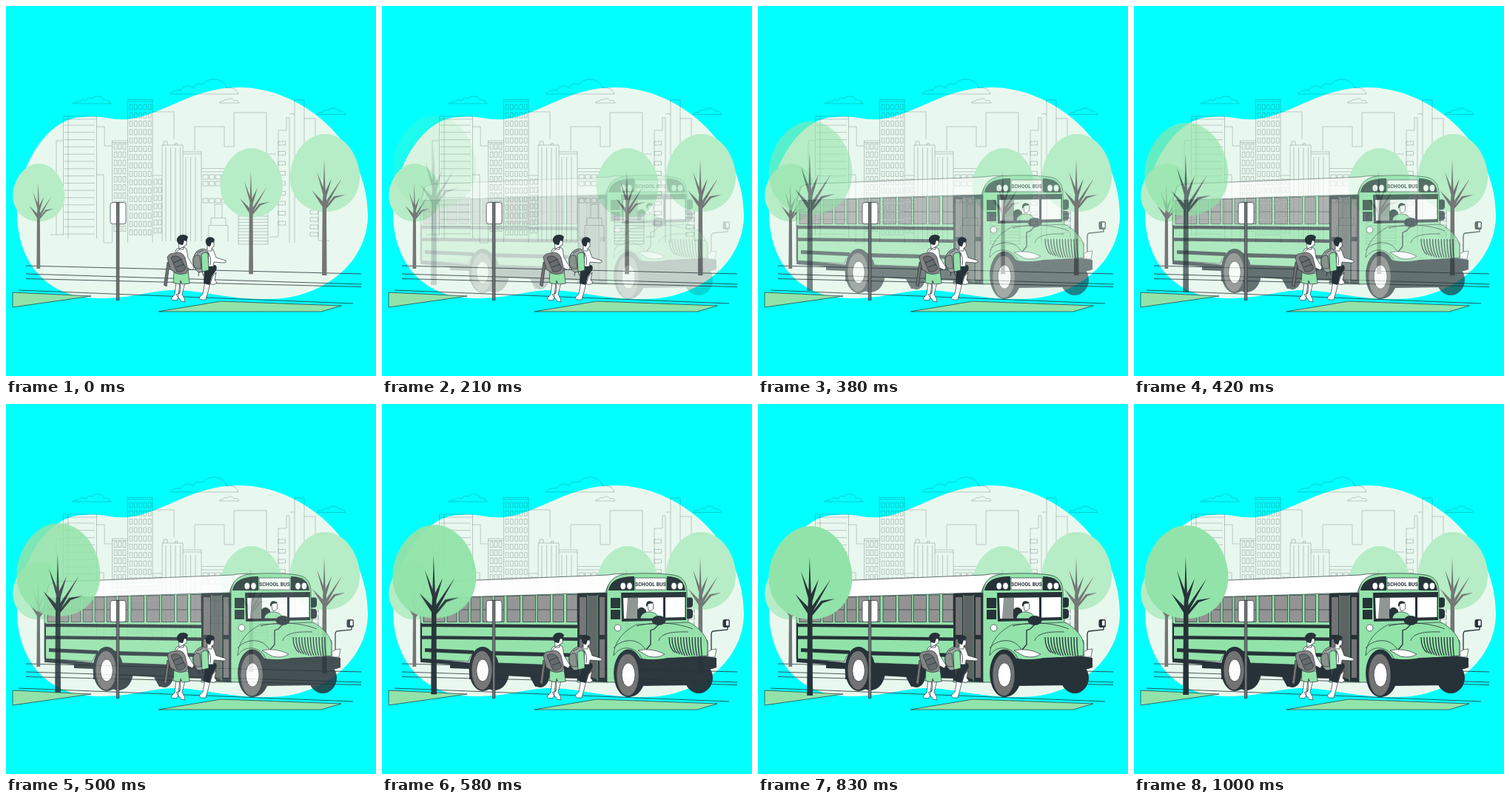
Animation of 500x500 px, one loop 1.04 s. Source, as an HTML page:

```html
<!DOCTYPE html>
<html lang="en">
<head>
<meta charset="utf-8">
<title>Walking to the bus</title>
<style>
  html, body { margin: 0; width: 100%; height: 100%; overflow: hidden; background: #0ff; }
  svg { display: block; width: 100vw; height: 100vh; }
  :root { --ink: #263238; --green: #92e3a9; --grey: #737373; }

  .thin { fill: none; stroke: var(--ink); stroke-opacity: .42; stroke-width: .6; }
  .line { fill: none; stroke: var(--ink); stroke-width: .8; }
  .rod { fill: none; stroke: var(--ink); stroke-width: 1.3; }
  .edge { stroke: var(--ink); stroke-width: .7; stroke-linejoin: round; }
  .ink { fill: var(--ink); }
  .green { fill: var(--green); }
  .white { fill: #fff; }
  .grey { fill: var(--grey); }
  .glass { fill: #939393; }
  .pale { --leaf: #b6ecc6; --wood: #747776; }
  .bold { --leaf: #92e3a9; --wood: #263238; }
  .label { font: 600 6.9px Roboto, Arial, sans-serif; font-stretch: 75%; text-anchor: middle; }

  #bus { animation: fade 1040ms infinite; }
  #near { animation: drop 1040ms infinite; }
  @keyframes fade {
    0% { opacity: 0; animation-timing-function: cubic-bezier(.36, -.01, .5, 1.38); }
    86.5%, 100% { opacity: 1; }
  }
  @keyframes drop {
    0% { opacity: 0; transform: translateY(-20px); animation-timing-function: cubic-bezier(.36, -.01, .5, 1.38); }
    86.5%, 100% { opacity: 1; transform: translateY(0); }
  }
</style>
</head>
<body>
<svg viewBox="0 0 500 500">
  <defs>
    <g id="tree">
      <path style="fill:var(--leaf)" d="M.6 0C33 0 57 36 57 70C57 103 33 126 .6 126C-31 126 -56 103 -56 70C-56 36 -31 0 .6 0Z"/>
      <path style="fill:var(--wood)" d="M-.6 42L1.400 92L11.500 72L3 102V108L28 71.500L4 115L15 101L34 98L17 104L3 121L3.600 229H-4.200L-3.400 118L-20 92L-3 109L-2.500 98L-12.500 61L-2 87Z"/>
    </g>
  </defs>

  <path fill="#e9f8ee" d="M15 280C15 220 54 150 105 150C130 147 140 155 165 153C215 147 250 110 315 110C400 110 489 185 489 283C489 345 430 396 355 396C300 397 265 384 228 384C195 384 175 395 125 395C50 395 15 340 15 280Z"/>

  <g class="thin">
    <path id="city"/>
    <path d="M90 132H142C140 128 136 126 132 127C131 121 119 120 117 125C113 123 109 125 108 128C104 126 99 127 98 130C95 129 92 130 90 132Z"/>
    <path d="M221 119H314C312 112 304 109 298 111C295 96 272 96 266 106C260 104 254 106 253 111C247 106 238 108 237 114C231 113 224 115 221 119Z"/>
    <path d="M288 131H315C314 128 311 127 308 128C307 124 300 124 299 127C296 126 294 127 293 129C291 128 289 129 288 131Z"/>
    <path d="M420 146.500H459C457 143 454 141 450 142C448 137 438 137 436 141C432 140 429 141 428 144C425 143 422 144 420 146.500Z"/>
  </g>

  <path class="line" d="M27 351L480 362M27 362L480 376M27 368.500L480 379.500M17 384L469 402"/>
  <path class="green edge" d="M9 387L115 392L9 407ZM206 413L290 399L453 405L426 413Z"/>

  <g class="pale">
    <use href="#tree" transform="translate(44 213)scale(.62)"/>
    <use href="#tree" transform="translate(331.300 192)scale(.743)"/>
    <use href="#tree" transform="translate(430.500 173)scale(.834)"/>
  </g>

  <g id="bus">
    <!-- underside and far wheels -->
    <path class="ink" d="M52 343L122 350L124 372L118 372V358L92 357V352L52 349ZM150 348L266 352V371L222 370L218 382H207L200 369L165 367ZM340 358H424V380L350 381Z"/>
    <ellipse class="ink" cx="214" cy="367" rx="12" ry="16"/>
    <ellipse class="ink" cx="428" cy="370" rx="19" ry="21"/>
    <ellipse class="ink" cx="152" cy="361" rx="20" ry="26"/>
    <!-- body -->
    <path class="green edge" d="M52 262L58 244L306 235V376H264V354L157 350C153 326 124 324 117 348L52 344Z"/>
    <path class="white edge" d="M53 263L58 245C62 241 70 240.500 78 240L306 231C316 229 330 229 342 230C318 231 306 238 302 255L264 256Z"/>
    <g id="windows" class="glass edge"></g>
    <path class="ink" d="M52 296.500L265 298.500V303L52 301ZM52 313L265 315.500V320L52 317.500ZM58 330L124 333V338L58 335ZM147 334L265 337V342L149 339.500ZM52 296H54V348H52Z"/>
    <path class="line" d="M265 256V352"/>
    <!-- door -->
    <path class="ink" d="M264 256L305 255V376L264 374Z"/>
    <path fill="#5e6263" d="M279 259H290V372L279 368Z"/>
    <path class="grey" d="M267 261H276V312H267ZM267 318H276V366H267ZM294 261H301V312H294ZM294 318H301V370H294Z"/>
    <path class="line" style="stroke:var(--green)" d="M278 258V370M291 258V374M304.500 255V376"/>
    <!-- cab -->
    <path class="green edge" d="M304 376V252C306 238 316 230 334 229.500C356 228 386 229 398 232C408 235 412 243 412 254L414 296L440 320V340L345 346L318 376Z"/>
    <path class="ink" d="M306 252C308 240 318 233 341 233V252ZM385 233C401 233 409 239 410 252H385Z"/>
    <path class="white edge" d="M342 235H384V251H342Z"/>
    <text class="label ink" x="363" y="245.500">SCHOOL BUS</text>
    <g class="white edge">
      <ellipse cx="325.800" cy="246" rx="3.800" ry="4.800"/><ellipse cx="334.500" cy="246" rx="3.800" ry="4.800"/>
      <ellipse cx="394.500" cy="246" rx="3.800" ry="4.800"/><ellipse cx="403" cy="246" rx="3.800" ry="4.800"/>
    </g>
    <path class="ink" d="M309 262H322V276H309ZM309 278H322V291H309ZM412 262Q419 260 420 264V272Q419 276 412 275ZM412 277Q420 276 420 280V287Q419 291 412 290Z"/>
    <path class="ink" d="M323 255L411 254V292L324 294Z"/>
    <path class="white" d="M326 262L409.500 261V288L327 290Z"/>
    <path fill="#8f9693" d="M332 262H346V290H330Z"/>
    <path class="ink" d="M345 290V278Q351 271 357 279V290ZM380 261H383V289H380Z"/>
    <path class="green edge" d="M349 290C350 283 356 281 361 281C369 281 373 285 374 290Z"/>
    <path class="white edge" d="M358.500 270Q362 266 366.500 270V277Q364 281 360 279Z"/>
    <path class="ink" d="M357.500 274C355 266 363 264 367 269L360.500 270Z"/>
    <!-- hood and grille -->
    <path class="green edge" d="M313 340C314 318 330 305 344 298L414 295C426 300 438 312 440 324V340L352 347C348 330 325 322 313 340Z"/>
    <path class="line" d="M313 330C322 318 346 314 356 332M344 300C372 293 400 296 420 304M374 320C376 312 386 307 414 308"/>
    <path id="grille" class="rod"/>
    <path class="white edge" d="M346 333Q364 329 382 338Q374 344 360 341ZM440 335Q445 331 452 331L450 342H441Z"/>
    <path class="ink" d="M342 342Q366 348 386 343L438 341L452 343V356Q440 361 408 363L344 360Z"/>
    <circle class="white edge" cx="318.500" cy="302.500" r="4.500"/>
    <!-- near wheels -->
    <g id="wheels"></g>
    <!-- mirrors -->
    <path class="rod" d="M374 298L368 304L363 306V325L357 332M467 300V305L447 307Q445 308 445 312V332"/>
    <ellipse class="ink" cx="374" cy="292.500" rx="9.500" ry="6.500"/>
    <rect class="ink" x="460.500" y="291" width="9.500" height="11" rx="2.500"/>
    <rect class="white" x="465" y="292.500" width="3.600" height="7" rx="1.200"/>
  </g>

  <g id="near"><use class="bold" href="#tree" transform="translate(70.400 164)"/></g>

  <!-- street sign -->
  <rect class="white edge" x="141" y="265.500" width="21" height="29" rx="3"/>
  <rect class="grey edge" x="149.300" y="265.500" width="3.600" height="132"/>

  <!-- first child -->
  <g>
    <path class="grey edge" d="M218 346L221 348L217 379L213.500 377Z"/>
    <path class="white edge" d="M230 372L228 390L223 395Q224 399 232 397L235 374ZM236 374L235 388L230 390L237 399L242 400Q242 395 238 390L242 373Z"/>
    <path class="green edge" d="M227 357H246L248 375L238 376L236 371L235 376L226 374Z"/>
    <path class="white edge" d="M230 329Q238 323 244 328L246 340L254 353L252 357L246 354V361H228L226 340Z"/>
    <path class="white edge" d="M233 315H244V323L240 325V329H234Z"/>
    <path class="ink" d="M231 318C229 309 242 306 246 312L244 318L241 317L239 323Q233 323 231 318Z"/>
    <path class="edge" fill="#858585" d="M218 340Q219 334 229 334Q238 331 242 340L246 357Q243 364 232 362L222 356Z"/>
    <path class="edge" fill="#666c6e" d="M223 340Q230 335 236 341L243 354Q240 361 231 359Z"/>
    <path class="line" d="M226 347L238 342M230 353L241 349M230 334Q233 327 240 326"/>
  </g>

  <!-- second child -->
  <g>
    <path class="white edge" d="M269 372L266 389L261 394Q262 398 270 397L272 390L276 374ZM279 366L276 375Q280 378 285 374L282 370L284 360Z"/>
    <path class="ink" d="M268 352L283 350Q286 353 284 357L278 366L275 377L267 375Z"/>
    <path class="white edge" d="M268 331Q274 325 280 329L284 340L297 344Q298 347 294 347L281 346L280 352H268Z"/>
    <path class="white edge" d="M272 317H281V325L278 327V331H272Z"/>
    <path class="ink" d="M270 320C268 311 280 310 282 316L280 320L278 319L276 325Q271 325 270 320Z"/>
    <path class="edge" fill="#9ca5a0" d="M253 341Q256 328 268 328L274 334L272 358L260 360Q251 353 253 341Z"/>
    <path class="green edge" d="M264 336Q270 330 273 336L274 357L265 359Z"/>
    <path class="edge" fill="#8a918d" d="M253 341Q257 334 262 338L264 355H257Q252 351 253 341Z"/>
    <path class="line" d="M258 334L266 330M261 359L260 365M265 359L267 365M272 332Q278 338 276 350"/>
  </g>
</svg>

<script>
  const byId = id => document.getElementById(id);
  const box = (x, y, w, h) => `M${x} ${y}h${w}v${h}h${-w}Z`;
  const range = (n, f) => Array.from({ length: n }, (_, i) => f(i)).join('');
  const grid = (x, y, cols, rows, dx, dy, w, h) =>
    range(cols, c => range(rows, r => box(x + c * dx, y + r * dy, w, h)));

  byId('city').setAttribute('d', [
    // striped tower on the left
    'M77.500 309V149H122.500V314M77.500 153H122.500M84 149V315',
    range(16, i => `M79 ${161 + i * 9.8}H120`),
    'M77 182H68V309M60 309H78M122 163H133V189H143M122 228H132V320H143',
    // two towers with window grids
    'M143.500 320V182H164M143.500 184.500H164',
    grid(146, 186, 3, 11, 6, 11.1, 3.8, 7.5),
    'M164.500 320V126.500H198V320M164.500 129H198',
    grid(167, 133, 5, 16, 6.3, 11.3, 3.8, 7),
    'M198 143H227V180M198 229H211',
    grid(200, 234, 2, 7, 6, 11, 4, 7),
    // ribbed towers
    'M211 318V188H239V197M213 188V183H218V188M228.500 188V185.500H231.500V188',
    range(4, i => `M${216 + i * 6.5} 191V318`),
    'M239 318V197H264V318M239 200H264',
    range(3, i => `M${243 + i * 6.5} 204V318`),
    // skyline and low blocks
    'M255 195V163H295V190H308V144H352V200H365',
    'M264 219.500H300M264 224H300',
    grid(266, 228, 4, 2, 8.6, 9, 7, 6),
    grid(266, 260, 4, 1, 8.6, 9, 7, 6),
    'M274 318V296.500H300V318M277 296V286.500H297V296M282 286V268H292V286',
    range(10, i => `M314 ${284 + i * 4.2}H354`),
    'M314 280V322M354 280V322',
    // towers on the right
    'M356 312H368V168H379V151H383V320M383 146H390V320M390 127H403V152H418V180M390 127V146M403 152V200',
    grid(368, 183, 1, 9, 0, 13.500, 9.500, 5),
    grid(411, 276, 1, 4, 0, 10, 11, 5),
    'M422 276V317H437'
  ].join(''));

  // side windows, each with a sash bar
  const starts = [56, 72, 88, 104, 120, 136, 152, 169, 190, 210, 231, 249.500];
  byId('windows').innerHTML = starts.map((x, i) => {
    const w = i < 7 ? 13 : i < 10 ? 17.500 : 14.500;
    const top = 262.500 - i * .45;
    return `<path d="${box(x, top, w, 294.500 - top)}M${x} 278h${w}"/>`;
  }).join('');

  byId('grille').setAttribute('d',
    range(12, i => `M${388 + i * 3.900} 315Q${388 + i * 3.900} 330 ${396 + i * 3.300} ${336 + Math.min(i, 4)}`));

  const ring = (cls, x, y, rx, ry) =>
    `<ellipse class="${cls}" cx="${x}" cy="${y}" rx="${rx}" ry="${ry}"/>`;
  const wheel = (x, y, k) =>
    ring('ink', x + k, y - 2 * k, 18.500 * k, 30 * k) + ring('ink', x + 4 * k, y, 18 * k, 27 * k) +
    ring('grey edge', x, y, 14 * k, 26.500 * k) + ring('white edge', x + k, y, 8.300 * k, 15 * k);
  byId('wheels').innerHTML = wheel(135, 360, 1) + wheel(332, 366, 1.08);
</script>
</body>
</html>
```
